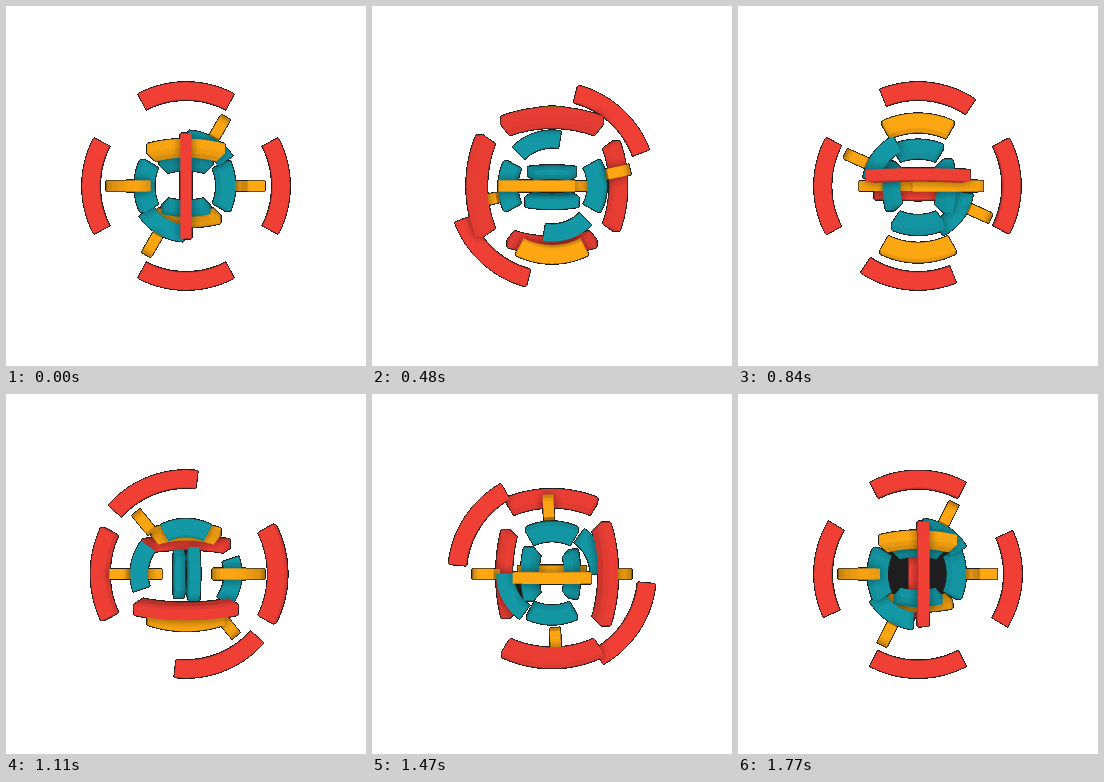
Recreate the animation shown at these times as an HTML page with a canvas. Size 360 by 360 pixels, loop 1800 ms.

```html
<!DOCTYPE html>
<html lang="en">
<head>
<meta charset="utf-8">
<title>Gyroscope</title>
<style>
  html, body { margin: 0; width: 100%; height: 100%; overflow: hidden; background: #fff; }
  canvas { display: block; width: 360px; height: 360px; }
</style>
</head>
<body>
<canvas id="stage" width="360" height="360"></canvas>
<script>
const ctx = document.getElementById('stage').getContext('2d');

const STEP = 30, STEPS = 60, TURN = Math.PI / STEPS;
const SIZE = 220, LEFT = 70, SS = 3, W = SIZE * SS;
const CAM = 1012, HALF = 27.5 * Math.PI / 180, DEPTH = 5.2, THICK = 17, SEGS = 14;
const BACK = 30;

// Arcs of a shell follow the spin axis (false) or the spin itself (true).
const SHELLS = [
  { r: 103.4, rgb: [240, 64, 54], start: 0, dir: 1, along: [false, false, true] },
  { r: 79.4, rgb: [255, 168, 18], start: Math.PI / 3, dir: -1, along: [false, true, false] },
  { r: 55.4, rgb: [20, 152, 165], start: Math.PI / 3, dir: 1, along: [false, false, true] }
];

const near = new Float32Array(W * W);
const tint = new Uint8Array(W * W);
const light = new Float32Array(W * W);
const image = ctx.createImageData(SIZE, SIZE);
const cover = new Uint8Array(SIZE * SIZE);
const seen = new Uint8Array(SIZE * SIZE);
const stack = new Int32Array(SIZE * SIZE);

const mix = (a, u, b, v) => a.map((x, i) => x * u + b[i] * v);
const dot = (a, b) => a[0] * b[0] + a[1] * b[1] + a[2] * b[2];
const cross = (a, b) => [
  a[1] * b[2] - a[2] * b[1],
  a[2] * b[0] - a[0] * b[2],
  a[0] * b[1] - a[1] * b[0]
];

function project(p) {
  const s = CAM / (CAM - p[2]);
  return [(SIZE / 2 + p[0] * s) * SS, (SIZE / 2 - p[1] * s) * SS, s];
}

function triangle(a, b, c, color, shade) {
  const area = (b[0] - a[0]) * (c[1] - a[1]) - (b[1] - a[1]) * (c[0] - a[0]);
  if (Math.abs(area) < 1e-6) return;
  const x0 = Math.max(0, Math.floor(Math.min(a[0], b[0], c[0])));
  const x1 = Math.min(W - 1, Math.ceil(Math.max(a[0], b[0], c[0])));
  const y0 = Math.max(0, Math.floor(Math.min(a[1], b[1], c[1])));
  const y1 = Math.min(W - 1, Math.ceil(Math.max(a[1], b[1], c[1])));
  for (let y = y0; y <= y1; y++) {
    for (let x = x0; x <= x1; x++) {
      const px = x + 0.5, py = y + 0.5;
      const v = ((px - a[0]) * (c[1] - a[1]) - (py - a[1]) * (c[0] - a[0])) / area;
      const w = ((b[0] - a[0]) * (py - a[1]) - (b[1] - a[1]) * (px - a[0])) / area;
      if (v < -1e-5 || w < -1e-5 || v + w > 1.00001) continue;
      const z = a[2] + v * (b[2] - a[2]) + w * (c[2] - a[2]);
      const i = y * W + x;
      if (z > near[i]) {
        near[i] = z;
        tint[i] = color;
        light[i] = shade;
      }
    }
  }
}

function face(points, normal, color) {
  const p = points[0];
  if (dot(normal, [-p[0], -p[1], CAM - p[2]]) <= 0) return;
  const shade = 0.85 + 0.15 * Math.max(0, normal[2]);
  const [a, b, c, d] = points.map(project);
  triangle(a, b, c, color, shade);
  triangle(a, c, d, color, shade);
}

function arc(center, span, r, color) {
  const axis = cross(center, span), flip = axis.map(x => -x);
  const ray = t => mix(center, Math.cos(t), span, Math.sin(t));
  const slice = t => {
    const u = ray(t), at = (rad, h) => mix(u, rad, axis, h);
    return [at(r, DEPTH), at(r, -DEPTH), at(r - THICK, -DEPTH), at(r - THICK, DEPTH)];
  };
  let last = slice(-HALF);
  face(last, ray(-HALF - Math.PI / 2), color);
  for (let i = 1; i <= SEGS; i++) {
    const t = -HALF + 2 * HALF * i / SEGS, next = slice(t);
    const out = ray(t - HALF / SEGS);
    [out, flip, out.map(x => -x), axis].forEach((n, k) => {
      const j = (k + 1) % 4;
      face([last[k], last[j], next[j], next[k]], n, color);
    });
    last = next;
  }
  face(last, ray(HALF + Math.PI / 2), color);
}

function shell(s, color, step) {
  const q = s.start + s.dir * step * TURN, c = Math.cos(q), n = Math.sin(q);
  const rings = [
    { mid: [0, c, n], axis: [1, 0, 0] },
    { mid: [-n, 0, c], axis: [0, 1, 0] },
    { mid: [c, n, 0], axis: [0, 0, 1] }
  ];
  rings.forEach((ring, i) => {
    const span = s.along[i] ? cross(ring.axis, ring.mid) : ring.axis;
    arc(ring.mid, span, s.r, color);
    arc(ring.mid.map(x => -x), span, s.r, color);
  });
}

// Soft shade from nearby parts that stand in front.
const around = [];
for (const reach of [4, 8]) {
  for (let k = 0; k < 8; k++) {
    const a = (k + reach / 8) * Math.PI / 4;
    around.push(Math.round(Math.sin(a) * reach * SS) * W + Math.round(Math.cos(a) * reach * SS));
  }
}

function contact(i) {
  let n = 0;
  for (const o of around) {
    const gap = near[i + o] - near[i];
    if (gap > 0.008 && gap < 0.2) n++;
  }
  return 1 - 0.03 * n;
}

function resolve() {
  const px = image.data, samples = SS * SS;
  for (let y = 0; y < SIZE; y++) {
    for (let x = 0; x < SIZE; x++) {
      let r = 0, g = 0, b = 0, hits = 0;
      for (let k = 0; k < samples; k++) {
        const i = (y * SS + Math.floor(k / SS)) * W + x * SS + k % SS;
        if (!near[i]) continue;
        const rgb = SHELLS[tint[i]].rgb, l = light[i] * contact(i);
        r += rgb[0] * l;
        g += rgb[1] * l;
        b += rgb[2] * l;
        hits++;
      }
      const o = y * SIZE + x, rest = (samples - hits) * BACK;
      cover[o] = hits;
      px[o * 4] = (r + rest) / samples;
      px[o * 4 + 1] = (g + rest) / samples;
      px[o * 4 + 2] = (b + rest) / samples;
      px[o * 4 + 3] = 255;
    }
  }
}

// Clears the backdrop reachable from outside, leaving a dark rim on the parts;
// enclosed gaps stay dark.
function clearOutside() {
  const solid = SS * SS / 2;
  let top = 0;
  seen.fill(0);
  const visit = i => {
    if (cover[i] || seen[i]) return;
    seen[i] = 1;
    stack[top++] = i;
  };
  visit(0);
  while (top) {
    const i = stack[--top], x = i % SIZE;
    const rim = Math.max(cover[i - 1] || 0, cover[i + 1] || 0,
      cover[i - SIZE] || 0, cover[i + SIZE] || 0);
    if (rim < solid) image.data[i * 4 + 3] = 0;
    if (x > 0) visit(i - 1);
    if (x < SIZE - 1) visit(i + 1);
    if (i >= SIZE) visit(i - SIZE);
    if (i < SIZE * (SIZE - 1)) visit(i + SIZE);
  }
}

function draw(step) {
  near.fill(0);
  SHELLS.forEach((s, i) => shell(s, i, step));
  resolve();
  clearOutside();
  ctx.putImageData(image, LEFT, LEFT);
}

const began = performance.now();
let shown = -1;

function tick() {
  const t = performance.now() - began;
  const step = Math.floor((t + 1) / STEP) % STEPS;
  if (step !== shown) draw(shown = step);
  requestAnimationFrame(tick);
}
tick();
</script>
</body>
</html>
```
